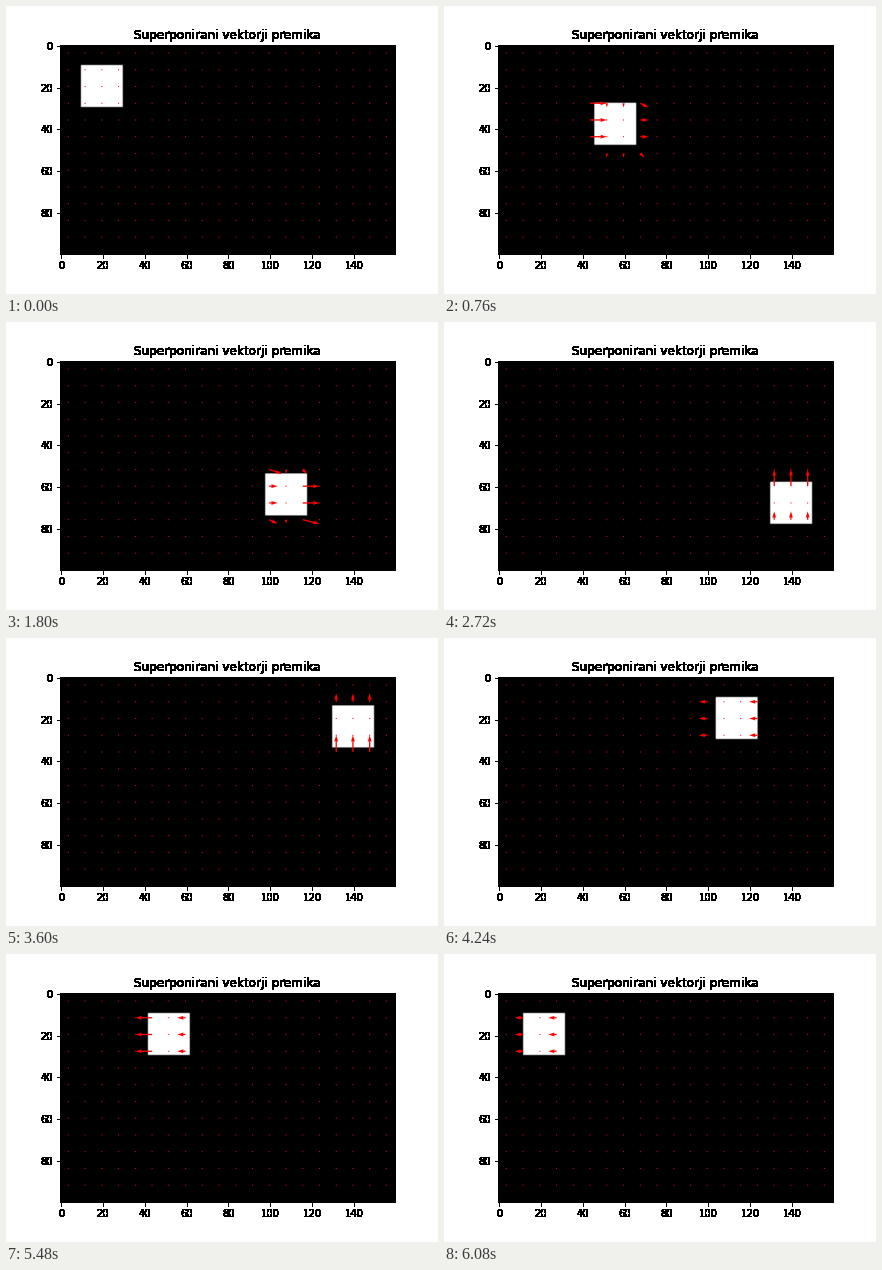
Recreate the animation shown at these times as a matplotlib script. Size 432 by 288 pixels, loop 6120 ms.

```python
import numpy as np
import matplotlib.pyplot as plt
from matplotlib.animation import FuncAnimation

W, H = 160, 100
SIDE = 20
BLOCK = 8
CROSS = [(-1, 0), (1, 0), (0, -1), (0, 1)]
DIAGONALS = [(-1, -1), (1, -1), (-1, 1), (1, 1)]

# Path of the square's top-left corner: diagonal, up, back left.
path = ([(10 + 2 * k, 10 + k) for k in range(61)]
        + [(130, 70 - 2 * k) for k in range(31)]
        + [(130 - 2 * k, 10) for k in range(61)])


def picture(corner):
    x, y = corner
    img = np.zeros((H, W))
    img[y:y + SIDE, x:x + SIDE] = 1
    return img


def match(prev, cur, x, y):
    """Logarithmic block search; returns the motion of the block at (x, y)."""
    block = cur[y:y + BLOCK, x:x + BLOCK]

    def cost(dx, dy):
        u, v = x + dx, y + dy
        if not (0 <= u <= W - BLOCK and 0 <= v <= H - BLOCK):
            return np.inf
        return np.abs(block - prev[v:v + BLOCK, u:u + BLOCK]).sum()

    dx = dy = 0
    best = cost(0, 0)
    step = 4
    while best > 0 and step >= 1:
        moves = CROSS if step > 1 else CROSS + DIAGONALS
        options = [(dx + step * a, dy + step * b) for a, b in moves]
        costs = [cost(*o) for o in options]
        low = min(costs)
        if low < best:
            best = low
            dx, dy = options[costs.index(low)]
            if step == 1:
                break
        else:
            step //= 2
    return -dx, -dy


def motion(prev, cur):
    field = [match(prev, cur, x, y) for y in rows for x in cols]
    return np.array(field, float).T


def harden(img, dpi):
    """Turn every touched pixel fully opaque."""
    img = img.copy()
    img[..., 3] = img[..., 3] > 0
    return img, 0, 0


cols = range(0, W - BLOCK + 1, BLOCK)
rows = range(0, H - BLOCK + 1, BLOCK)
gx, gy = np.meshgrid(np.array(cols) + 3.5, np.array(rows) + 3.5)

plt.rcParams["font.family"] = "DejaVu Sans"
fig = plt.figure(figsize=(6, 4), dpi=72, facecolor="white")
fig.subplots_adjust(left=0.125, right=0.9, bottom=0.125, top=0.88)
ax = fig.add_subplot()
image = ax.imshow(picture(path[0]), cmap="gray", vmin=0, vmax=1)
zero = np.zeros(gx.size)
arrows = ax.quiver(gx, gy, zero, zero, color="red", angles="xy",
                   scale_units="xy", scale=0.5)
ax.set_xlim(-0.5, W - 0.5)
ax.set_ylim(H - 0.5, -0.5)
title = ax.set_title("Superponirani vektorji premika")
for part in (title, ax.xaxis, ax.yaxis, *ax.spines.values()):
    part.set_agg_filter(harden)


def update(i):
    prev, cur = picture(path[max(i - 1, 0)]), picture(path[i])
    image.set_data(prev)
    arrows.set_UVC(*motion(prev, cur))
    return image, arrows


anim = FuncAnimation(fig, update, frames=len(path), interval=40,
                     init_func=lambda: update(0), repeat=True, repeat_delay=0)
plt.show()
```
